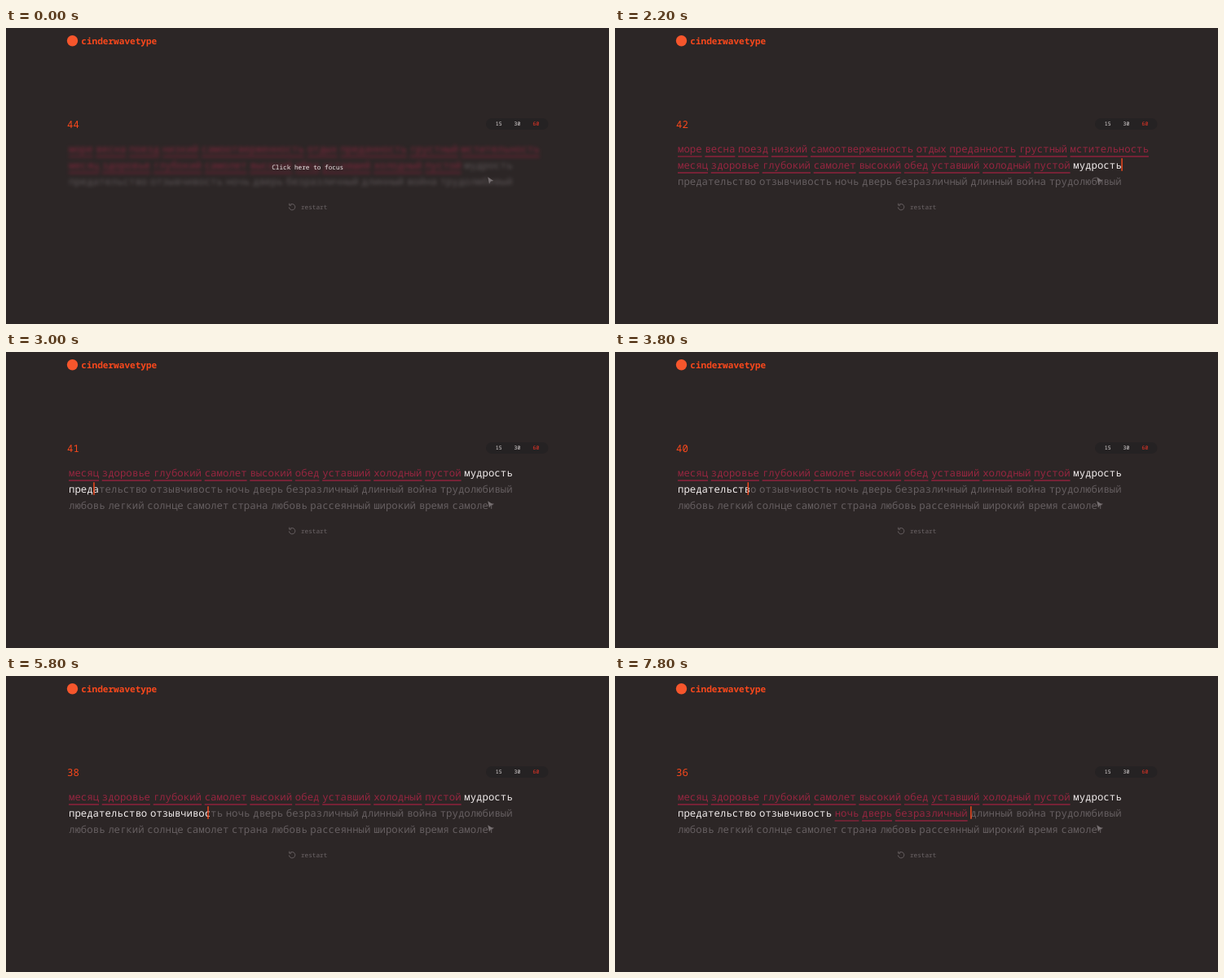
These frames come from a looping animation (740x364 px, 8 s). An HTML page:

```html
<!DOCTYPE html>
<html lang="ru">
<head>
<meta charset="utf-8">
<title>cinderwavetype</title>
<style>
  html, body { margin: 0; width: 100%; height: 100%; overflow: hidden; background: #2c2626; }
  svg { display: block; width: 100vw; height: 100vh; }
  text {
    font-family: "Noto Sans Mono", "DejaVu Sans Mono", monospace;
    text-rendering: geometricPrecision;
    white-space: pre;
  }
  .accent { fill: #fa481c; }
  .logo { font-size: 11.07px; font-weight: 700; }
  .count, .word { font-size: 12.35px; }
  .word { fill: #665f61; }
  .good { fill: #f1ecec; }
  .bad { fill: #972640; }
  .line { stroke: #8f213b; stroke-width: 1.3; }
  .small { font-size: 7.72px; }
  .option { font-size: 6.5px; text-anchor: middle; }
  .muted { fill: #6c6567; }
</style>
</head>
<body>
<svg viewBox="0 0 740 364">
  <circle cx="81.5" cy="15.7" r="6.7" fill="#f6562c"/>
  <text class="logo accent" x="92.3" y="19.6">cinderwavetype</text>

  <text id="count" class="count accent" x="75" y="122.6"></text>

  <rect x="589" y="111" width="76.5" height="14" rx="7" fill="#252223"/>
  <g fill="#e4dfdf">
    <text class="option" x="604.7" y="120.4">15</text>
    <text class="option" x="627.5" y="120.4">30</text>
    <text class="option" x="650.4" y="120.4" style="fill:#ee3526">60</text>
  </g>

  <g id="words"></g>
  <rect id="caret" class="accent" y="160.2" width="1.4" height="15.6"/>
  <text id="hint" class="small good" x="326.2" y="174.2">Click here to focus</text>

  <g fill="none" stroke="#6c6567" stroke-width="0.9">
    <path d="M348.6 217.4A3.7 3.7 0 1 1 347.4 220.4"/>
    <path d="M347.7 215.6V218.1H350.2"/>
  </g>
  <text class="small muted" x="361.9" y="222.6">restart</text>

  <path d="M591.3 183.2L598.3 188L594.9 188.5L593 191.8Z" fill="#777072"/>
</svg>
<script>
const LOOP = 8000, ADVANCE = 7.41, GAP = 3.7, LEFT = 77, PITCH = 20;
const FOCUS = 250, FOCUS_TIME = 240, SCROLL = 2350, GLIDE = 100;
const ROWS = [
  'море весна поезд низкий самоотверженность отдых преданность грустный мстительность',
  'месяц здоровье глубокий самолет высокий обед уставший холодный пустой мудрость',
  'предательство отзывчивость ночь дверь безразличный длинный война трудолюбивый',
  'любовь легкий солнце самолет страна любовь рассеянный широкий время самолет'
];
const byId = id => document.getElementById(id);
const clamp = v => Math.min(1, Math.max(0, v));
const layer = byId('words'), caret = byId('caret'), hint = byId('hint'), count = byId('count');

function add(parent, tag, attrs = {}) {
  const el = document.createElementNS('http://www.w3.org/2000/svg', tag);
  for (const key in attrs) el.setAttribute(key, attrs[key]);
  return parent.appendChild(el);
}

const rowGroups = [];
const words = ROWS.flatMap((row, r) => {
  const group = rowGroups[r] = add(layer, 'g');
  let x = LEFT;
  return row.split(' ').map(text => {
    const y = 152.6 + r * PITCH, end = x + text.length * ADVANCE;
    const label = add(group, 'text', { class: 'word', x, y });
    const word = {
      text, x,
      done: add(label, 'tspan'),
      rest: add(label, 'tspan'),
      line: add(group, 'line', { class: 'line', x1: x, x2: end, y1: y + 5.4, y2: y + 5.4 })
    };
    x = end + GAP;
    return word;
  });
});

// Each key press: time, word, typed letters, whether the word is wrong.
const START = words.findIndex(w => w.text === 'мудрость');
const keys = [{ time: -LOOP, word: START, typed: 0 }];
const press = (time, word, typed, wrong = false) => keys.push({ time, word, typed, wrong });
function type(word, from, to, time, step) {
  for (let n = from; n <= to; n++) press(time + (n - from) * step, word, n);
}
type(START, 1, 8, 1160, 125);
press(SCROLL, START + 1, 0);
type(START + 1, 1, 13, 2560, 107.5);
press(3957, START + 2, 0);
type(START + 2, 1, 2, 4065, 107);
type(START + 2, 3, 5, 4330, 140);
type(START + 2, 6, 12, 5250, 125);
press(6190, START + 3, 0);
[6790, 7190, 7590].forEach((time, i) => {
  press(time, START + 3 + i, 1, true);
  press(time + 100, START + 4 + i, 0);
});

const caretX = key => words[key.word].x + key.typed * ADVANCE;

function paintWord(word, typed, wrong, underlined) {
  word.done.textContent = word.text.slice(0, typed);
  word.rest.textContent = word.text.slice(typed);
  word.done.setAttribute('class', wrong ? 'bad' : 'good');
  word.line.style.display = underlined ? '' : 'none';
}

let shown = -1;
function paintWords(index) {
  if (index === shown) return;
  shown = index;
  const past = keys.slice(0, index + 1), now = keys[index];
  words.forEach((word, i) => {
    const wrong = i < START || past.some(k => k.word === i && k.wrong);
    const passed = i < now.word;
    const typed = passed ? word.text.length : i === now.word ? now.typed : 0;
    paintWord(word, typed, wrong, passed && wrong);
  });
}

function draw(t) {
  const index = keys.findLastIndex(k => k.time <= t);
  paintWords(index);

  const scroll = t >= SCROLL ? 1 : 0;
  layer.setAttribute('transform', `translate(0 ${-scroll * PITCH})`);
  rowGroups.forEach((g, r) => {
    g.style.display = r >= scroll && r < scroll + 3 ? '' : 'none';
  });

  const key = keys[index], before = keys[Math.max(0, index - 1)];
  const glide = key.time === SCROLL ? 1 : clamp((t - key.time) / GLIDE);
  const x = caretX(before) + (caretX(key) - caretX(before)) * glide;
  caret.setAttribute('x', x - 0.2);

  const focus = clamp((t - FOCUS) / FOCUS_TIME);
  layer.style.filter = focus < 1 ? `blur(${1.9 * (1 - focus)}px)` : 'none';
  layer.style.opacity = 0.8 + 0.2 * focus;
  hint.style.opacity = 1 - focus;
  caret.style.opacity = focus;

  count.textContent = 44 - Math.floor((t + 700) / 1000);
}

function frame(now) {
  draw(now % LOOP);
  requestAnimationFrame(frame);
}
draw(0);
requestAnimationFrame(frame);
</script>
</body>
</html>
```
